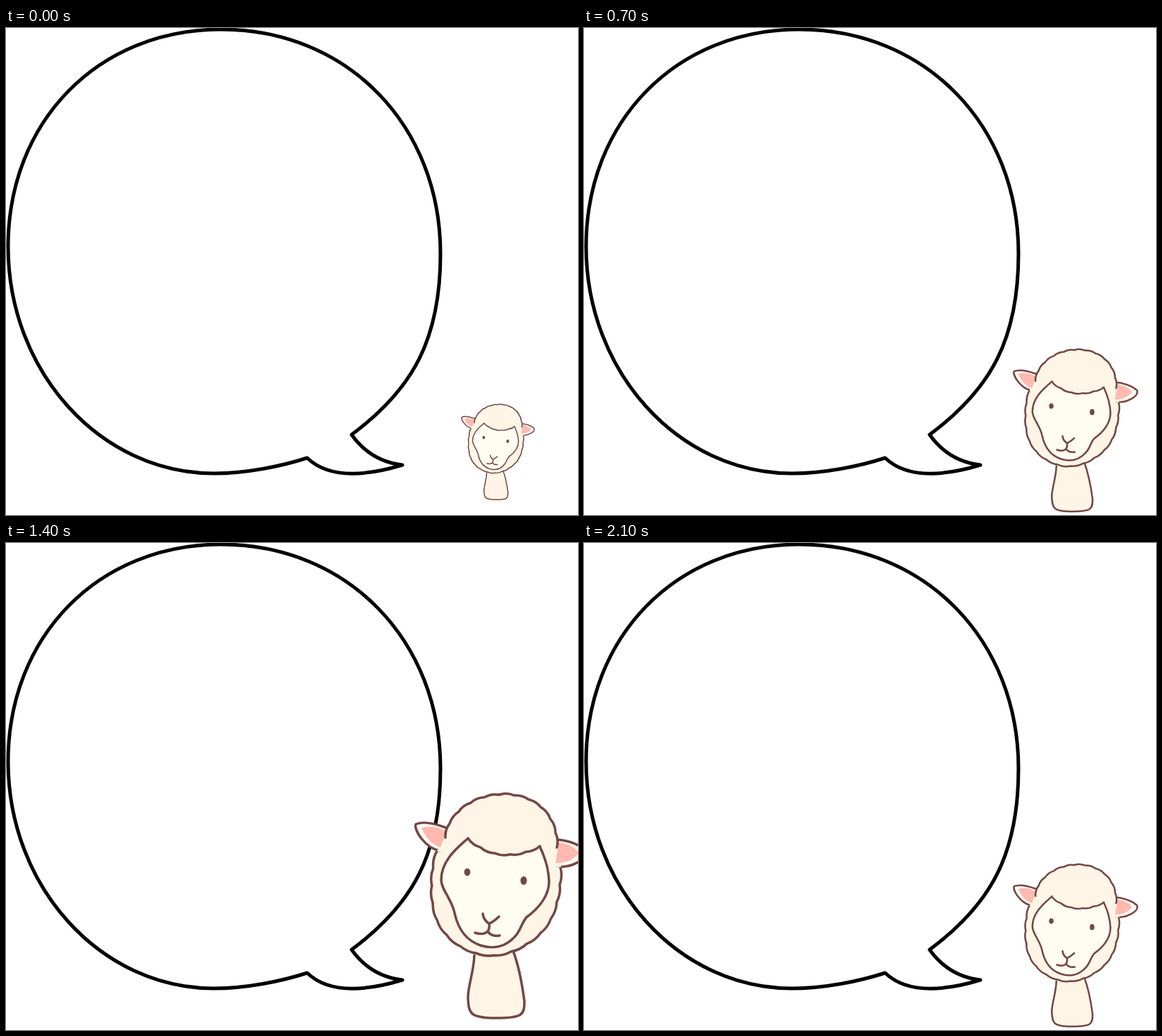
These frames come from a looping animation (811 px wide and 691 px high, 2800 ms). An HTML page:

```html
<!DOCTYPE html>
<html lang="en">
<head>
<meta charset="utf-8">
<title>Sheep and speech bubble</title>
<style>
  html, body { margin: 0; width: 100%; height: 100%; overflow: hidden; background: #fff; }
  svg { display: block; }
  path { stroke-linecap: round; stroke-linejoin: round; }
  .bubble { fill: none; stroke: #000; stroke-width: 5; }
  #sheep { fill: none; stroke: #734745; stroke-width: 3.5; }
  #sheep .wool { fill: #fff5e6; }
  #sheep .face { fill: #fffcf1; }
  #sheep .ear { fill: #fffaf4; }
  #sheep .pink { fill: #ffb9af; }
  #sheep .eye { fill: #734745; }
  #sheep .flat { stroke: none; }
</style>
</head>
<body>
<svg width="811" height="691" viewBox="0 0 811 691">
  <path class="bubble" d="M490 577C578 512 616 440 616 320C616 139 485 2 305 2C130 2 3 133 3 310
    C3 488 134 632 295 632C340 632 390 622 427 610C452 634 496 640 562 620C535 617 510 605 490 577Z"/>
  <g id="sheep">
    <path class="wool" d="M664 585C663 610 655 628 655 645C656 668 658 674 695 674S735 670 735 650
      C733 635 729 604 718 576"/>
    <path class="ear" d="M624 404Q595 393 581 399C578 407 594 433 616 437"/>
    <path class="ear" d="M784 421Q808 424 822 436C827 448 801 462 780 459"/>
    <path class="wool" data-bumps="15" data-depth="-2" d="M611 437C602 465 600 515 614 541
      S660 586 690 585S752 563 766 544S787 490 786 460"/>
    <path class="wool flat" d="M622 417L611 437L787 460L781 432Z"/>
    <path class="pink flat" d="M589 404Q610 399 624 410L616 432Q598 426 589 404Z"/>
    <path class="pink flat" d="M784 425Q806 428 812 440Q800 455 779 454Z"/>
    <path class="wool" data-bumps="11" data-depth="2" d="M623 418C626 385 662 357 706 357S782 385 781 432"/>
    <path class="face" d="M655 419C643 430 617 449 617 478C617 492 632 505 636 525C641 548 652 564 673 571
      C692 577 708 572 719 561C730 552 730 540 738 531C756 518 770 500 770 480Q769 456 757 431"/>
    <path class="wool" data-bumps="5" data-depth="-2" d="M655 419C672 434 690 442 708 442S742 438 757 430"/>
    <path d="M676 526Q677 535 685 540Q692 537 699 530M685 540Q686 547 683 551Q677 557 665 553M683 551Q688 559 700 557"/>
    <ellipse class="eye flat" cx="654" cy="467" rx="4.4" ry="5.4"/>
    <ellipse class="eye flat" cx="734" cy="479" rx="4.6" ry="6"/>
  </g>
</svg>
<script>
// Turns a smooth outline into equal woolly curls; the sign of depth picks the side.
function addCurls(path) {
  const { bumps, depth } = path.dataset;
  const step = path.getTotalLength() / bumps;
  let a = path.getPointAtLength(0);
  let d = `M${a.x} ${a.y}`;
  for (let i = 1; i <= bumps; i++) {
    const b = path.getPointAtLength(i * step);
    const push = 2 * depth / Math.hypot(b.x - a.x, b.y - a.y);
    const cx = (a.x + b.x) / 2 + (b.y - a.y) * push;
    const cy = (a.y + b.y) / 2 - (b.x - a.x) * push;
    d += `Q${cx} ${cy} ${b.x} ${b.y}`;
    a = b;
  }
  path.setAttribute('d', d);
}
document.querySelectorAll('[data-bumps]').forEach(addCurls);

const pose = (x, y, scale) => `translate(${x} ${y}) scale(${scale})`;
const far = pose(399, 382.4, 0.4255);
const middle = pose(189.7, 198.7, 0.723);
const near = pose(0, 0, 1);
const poses = [far, middle, near, middle];

const sheep = document.getElementById('sheep');
const hold = 700, start = performance.now();

function draw(now) {
  const step = Math.floor(Math.max(0, now - start) / hold) % poses.length;
  sheep.setAttribute('transform', poses[step]);
  requestAnimationFrame(draw);
}
draw(start);
</script>
</body>
</html>
```
